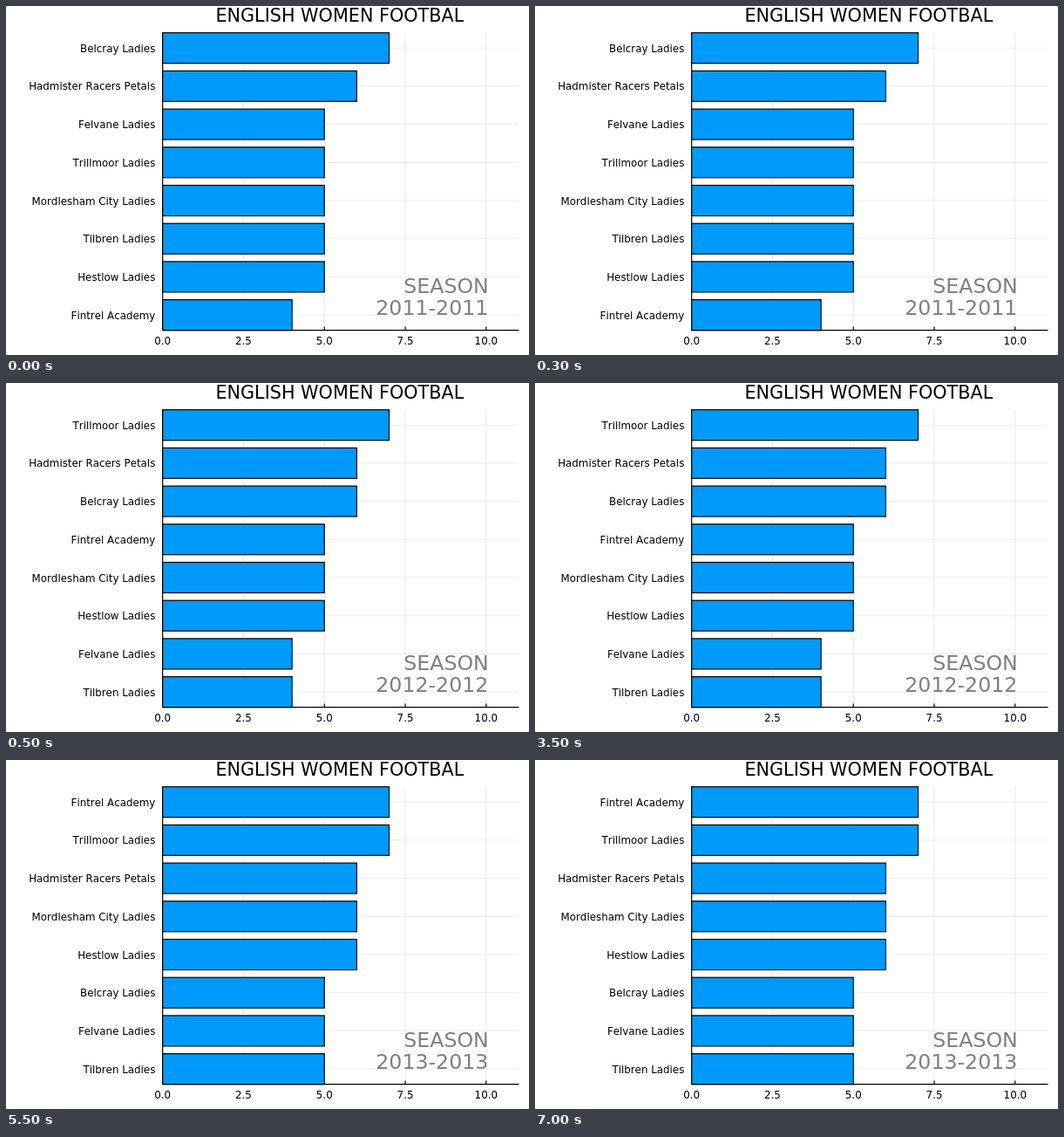
An HTML page with a canvas that plays this animation: 600x400 px, repeating every 8 s.

```html
<!DOCTYPE html>
<html lang="en">
<head>
<meta charset="utf-8">
<title>Season chart</title>
<style>
  html, body { margin: 0; width: 100%; height: 100%; overflow: hidden; background: #fff; }
  canvas { display: block; width: 600px; height: 400px; }
</style>
</head>
<body>
<canvas id="stage" width="600" height="400"></canvas>
<script>
const ctx = document.getElementById('stage').getContext('2d');
const LOOP = 8000;
const LEFT = 179.7, RIGHT = 588.5, TOP = 30.7, BOTTOM = 371.6;
const UNIT = 37.11;
const ROW = (BOTTOM - TOP) / 7.8;
const BAR = ROW * 0.8;

const clubs = {
  belcray: 'Belcray Ladies',
  hadmister: 'Hadmister Racers Petals',
  felvane: 'Felvane Ladies',
  trillmoor: 'Trillmoor Ladies',
  mordlesham: 'Mordlesham City Ladies',
  tilbren: 'Tilbren Ladies',
  hestlow: 'Hestlow Ladies',
  fintrel: 'Fintrel Academy'
};

const seasons = [
  { start: 0, year: 2011, values: [7, 6, 5, 5, 5, 5, 5, 4],
    order: 'belcray hadmister felvane trillmoor mordlesham tilbren hestlow fintrel' },
  { start: 500, year: 2012, values: [7, 6, 6, 5, 5, 5, 4, 4],
    order: 'trillmoor hadmister belcray fintrel mordlesham hestlow felvane tilbren' },
  { start: 5500, year: 2013, values: [7, 7, 6, 6, 6, 5, 5, 5],
    order: 'fintrel trillmoor hadmister mordlesham hestlow belcray felvane tilbren' }
];

const tickX = value => LEFT + value * UNIT;
const rowY = i => TOP + BAR / 2 + i * ROW;

function line(x1, y1, x2, y2) {
  ctx.beginPath();
  ctx.moveTo(x1, y1);
  ctx.lineTo(x2, y2);
  ctx.stroke();
}

function label(text, x, y, size, align, color = '#000') {
  ctx.font = `${size}px "DejaVu Sans", sans-serif`;
  ctx.fontKerning = 'none';
  ctx.textAlign = align;
  ctx.fillStyle = color;
  ctx.fillText(text, x, y);
}

function drawAxes() {
  const ticks = [0, 2.5, 5, 7.5, 10];
  ctx.lineWidth = 0.8;
  ctx.strokeStyle = 'rgba(0, 0, 0, 0.1)';
  for (const t of ticks) line(tickX(t), TOP, tickX(t), BOTTOM);
  for (let i = 0; i < 8; i++) line(LEFT, rowY(i), RIGHT, rowY(i));

  ctx.lineWidth = 1.2;
  ctx.strokeStyle = '#000';
  line(LEFT, BOTTOM, RIGHT, BOTTOM);
  line(LEFT, TOP, LEFT, BOTTOM);
  for (const t of ticks) {
    line(tickX(t), BOTTOM, tickX(t), BOTTOM - 4);
    label(t.toFixed(1), tickX(t), 387.7, 11.85, 'center');
  }
}

function drawBars(season) {
  ctx.lineWidth = 1.2;
  season.order.split(' ').forEach((key, i) => {
    const y = rowY(i);
    const box = [LEFT, y - BAR / 2, season.values[i] * UNIT, BAR];
    ctx.fillStyle = '#009afa';
    ctx.fillRect(...box);
    ctx.strokeRect(...box);
    label(clubs[key], 171.3, y + 4.5, 11.85, 'right');
  });
}

function draw(time) {
  const season = seasons.filter(s => s.start <= time).pop();
  ctx.fillStyle = '#fff';
  ctx.fillRect(0, 0, 600, 400);
  drawAxes();
  drawBars(season);
  label('ENGLISH WOMEN FOOTBAL', 382.8, 18.3, 20.74, 'center');
  label('SEASON', 553.8, 328.8, 23.7, 'right', '#808080');
  label(`${season.year}-${season.year}`, 553.4, 354, 23.7, 'right', '#808080');
}

const origin = performance.now();
function tick() {
  draw((performance.now() - origin) % LOOP);
  requestAnimationFrame(tick);
}
tick();
</script>
</body>
</html>
```
